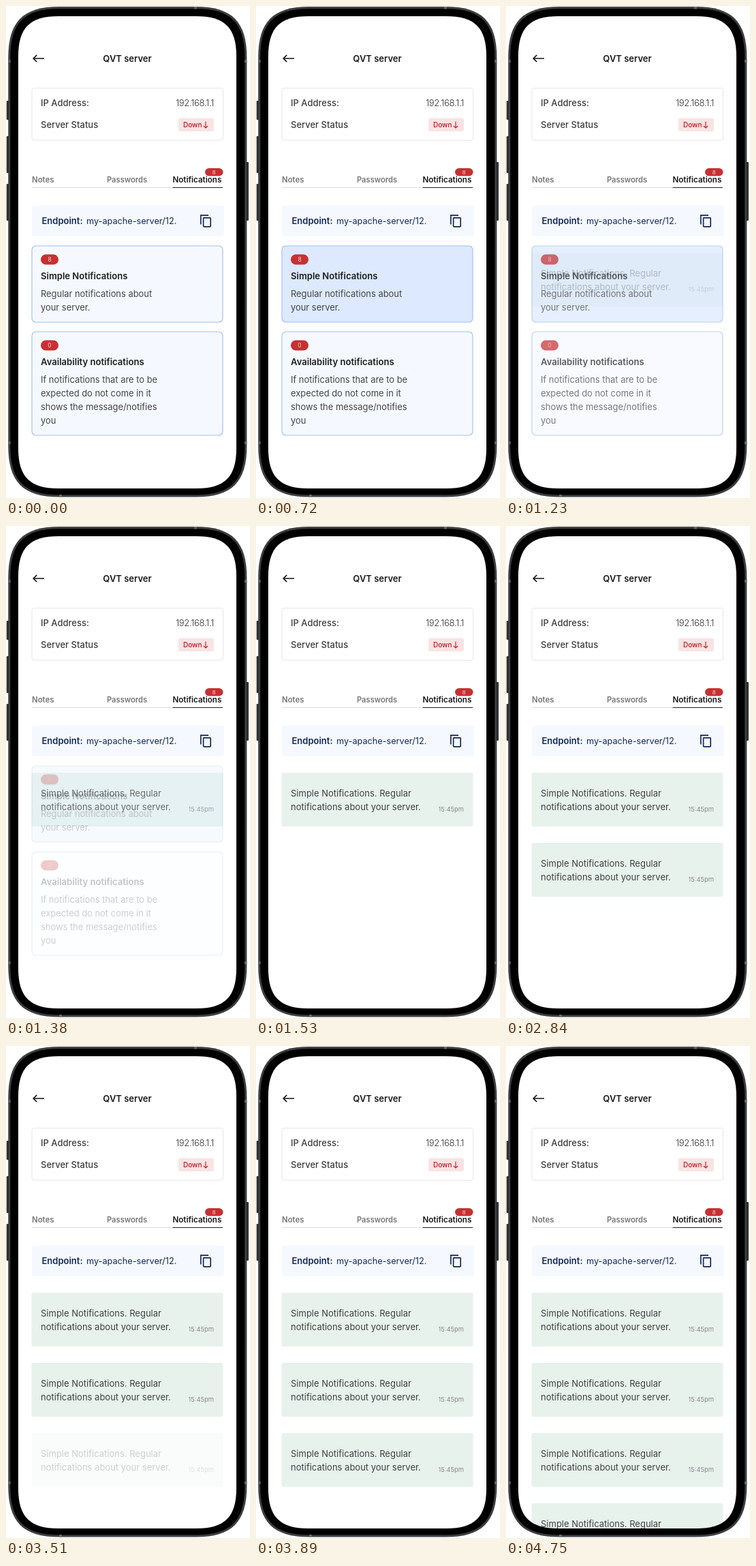
An HTML page with a canvas that plays this animation: 358 by 722 pixels, repeating every 4.83 s.

```html
<!DOCTYPE html>
<html lang="en">
<head>
<meta charset="utf-8">
<title>Server notifications</title>
<style>
html, body { margin: 0; width: 100%; height: 100%; overflow: hidden; background: #fff; }
canvas { display: block; width: 358px; height: 722px; }
</style>
</head>
<body>
<canvas id="stage"></canvas>
<script>
const W = 358, H = 722, LOOP = 4830;
const canvas = document.getElementById('stage');
const ctx = canvas.getContext('2d');
const ratio = window.devicePixelRatio || 1;
canvas.width = W * ratio;
canvas.height = H * ratio;

const RED = '#c83032', NAVY = '#14295a', PALE = '#f5f9ff';
const SCREEN = [18, 15, 320, 693, 47];
const CARD_TOP = 362, CARD_STEP = 103;

function paint(fill, stroke, line = 1) {
  if (fill) { ctx.fillStyle = fill; ctx.fill(); }
  if (stroke) { ctx.strokeStyle = stroke; ctx.lineWidth = line; ctx.stroke(); }
}

function box(x, y, w, h, r, fill, stroke, line) {
  ctx.beginPath();
  ctx.roundRect(x, y, w, h, r);
  paint(fill, stroke, line);
}

// Rounded rectangle whose corners ease into the straight sides.
function smoothPath(x, y, w, h, r) {
  const e = r * 1.25, c = r * 0.364;
  const right = x + w, bottom = y + h;
  ctx.beginPath();
  ctx.moveTo(x, y + e);
  ctx.bezierCurveTo(x, y + c, x + c, y, x + e, y);
  ctx.lineTo(right - e, y);
  ctx.bezierCurveTo(right - c, y, right, y + c, right, y + e);
  ctx.lineTo(right, bottom - e);
  ctx.bezierCurveTo(right, bottom - c, right - c, bottom, right - e, bottom);
  ctx.lineTo(x + e, bottom);
  ctx.bezierCurveTo(x + c, bottom, x, bottom - c, x, bottom - e);
  ctx.closePath();
}

function text(str, x, y, size, weight, color, align = 'left', spacing = 0) {
  ctx.font = `${weight} ${size}px Inter, sans-serif`;
  ctx.letterSpacing = spacing + 'px';
  ctx.textAlign = align;
  ctx.fillStyle = color;
  ctx.fillText(str, x, y);
}

function path(points, color, width) {
  ctx.beginPath();
  points.forEach(([x, y], i) => i ? ctx.lineTo(x, y) : ctx.moveTo(x, y));
  paint(null, color, width);
}

// Eased progress, held for each of a fixed number of steps.
function fade(t, start, end, steps) {
  if (t < start) return 0;
  const done = Math.floor((t - start) / (end - start) * (steps - 1) + 0.001) + 1;
  return 1 - (1 - Math.min(1, done / steps)) ** 1.5;
}

function withAlpha(alpha, draw) {
  if (alpha <= 0) return;
  ctx.globalAlpha = alpha;
  draw();
  ctx.globalAlpha = 1;
}

function phone() {
  for (const [y, h] of [[139, 28], [191, 54], [261, 54]]) box(0.8, y, 4, h, 1, '#303132');
  box(352, 229, 4, 86, 1, '#303132');
  smoothPath(3.3, 1, 350, 719.5, 60);
  paint('#2b2c2d');
  smoothPath(4.8, 2.5, 347, 716.5, 58.5);
  paint(null, '#515354');
  smoothPath(6.5, 4.2, 343.6, 713.1, 56.8);
  paint('#000');
  ctx.fillStyle = '#66686a';
  for (const x of [3.3, 350]) {
    ctx.fillRect(x, 79, 3.3, 4);
    ctx.fillRect(x, 639, 3.3, 4);
  }
  ctx.fillRect(276, 1, 4, 3.3);
  ctx.fillRect(78, 717, 4, 3.3);
  smoothPath(...SCREEN);
  paint('#fff');
}

function header() {
  path([[56, 77], [40.3, 77]], '#111', 1.7);
  path([[45.2, 72], [40.2, 77], [45.2, 82]], '#111', 1.7);
  text('QVT server', 178, 82, 13, 600, '#1b1b1b', 'center');

  box(38, 120.5, 280.5, 76.5, 3, '#fff', '#e6e6e6');
  text('IP Address:', 51, 147, 13, 500, '#3d3d3d');
  text('192.168.1.1', 305, 147, 13, 300, '#333', 'right', -0.3);
  text('Server Status', 51, 179, 13, 500, '#3d3d3d');
  box(253, 164.5, 52, 19.5, 3, '#fae3e4');
  text('Down', 260, 178, 10, 500, '#b8181c');
  path([[293, 169.5], [293, 179]], '#b8181c', 1.1);
  path([[289.8, 175.8], [293, 179], [296.2, 175.8]], '#b8181c', 1.1);
}

function tabs() {
  path([[38, 266.5], [245, 266.5]], '#dedede', 1);
  path([[244.5, 266.5], [318, 266.5]], '#222', 1.2);
  text('Notes', 38, 259, 11.4, 600, '#777');
  text('Passwords', 148, 259, 11.2, 600, '#777');
  box(292, 238, 26.5, 11.5, 5.75, RED);
  text('8', 305.3, 246.6, 8, 300, '#fff', 'center');
  text('Notifications', 244.5, 259, 11.6, 600, '#171717');
}

function endpoint() {
  box(38, 292.5, 282, 45.5, 4, PALE);
  text('Endpoint:', 52.5, 320, 13, 600, NAVY);
  text('my-apache-server/12.', 118, 320, 12.7, 400, NAVY);
  path([[285.8, 320.5], [285.8, 307.2], [297, 307.2]], NAVY, 1.7);
  box(289.6, 310.8, 10.6, 13, 0.8, null, NAVY, 1.7);
}

function category(y, h, count, title, lines, fill) {
  box(38, y, 280, h, 6, fill, '#9fbff0', 1.1);
  box(51, y + 12.5, 26, 15, 7.5, RED);
  text(count, 64, y + 23.1, 8.5, 300, '#fff', 'center');
  text(title, 51, y + 49.2, 13.1, 600, '#1d1d1d');
  lines.forEach((line, i) => text(line, 51, y + 75.3 + i * 19.8, 12.9, 400, '#444'));
}

function categories(press) {
  const mix = (a, b) => Math.round(a + (b - a) * press);
  const fill = `rgb(${mix(245, 221)}, ${mix(249, 233)}, 255)`;
  category(352, 112, '8', 'Simple Notifications',
    ['Regular notifications about', 'your server.'], fill);
  category(478, 152, '0', 'Availability notifications',
    ['If notifications that are to be', 'expected do not come in it',
     'shows the message/notifies', 'you'], PALE);
}

function message(index) {
  const y = CARD_TOP + index * CARD_STEP;
  box(37.5, y, 281, 79, 3, '#e8f2ed');
  text('Simple Notifications. Regular', 51, y + 34.8, 13, 400, '#444');
  text('notifications about your server.', 51, y + 54.5, 13, 400, '#444');
  text('15:45pm', 305, y + 57, 9.5, 300, '#777', 'right');
}

function render(t) {
  const press = fade(t, 500, 720, 4);
  const shown = [
    fade(t, 1230, 1530, 5),
    fade(t, 2530, 2840, 5),
    fade(t, 3510, 3890, 6),
    fade(t, 4470, 4750, 5)
  ];
  ctx.setTransform(ratio, 0, 0, ratio, 0, 0);
  ctx.fillStyle = '#fff';
  ctx.fillRect(0, 0, W, H);
  phone();
  ctx.save();
  smoothPath(...SCREEN);
  ctx.clip();
  header();
  tabs();
  endpoint();
  withAlpha(1 - shown[0], () => categories(press));
  ctx.globalCompositeOperation = 'multiply';
  shown.forEach((alpha, i) => withAlpha(alpha, () => message(i)));
  ctx.restore();
}

const begin = performance.now();
function tick() {
  render((performance.now() - begin) % LOOP);
  requestAnimationFrame(tick);
}
tick();
</script>
</body>
</html>
```
